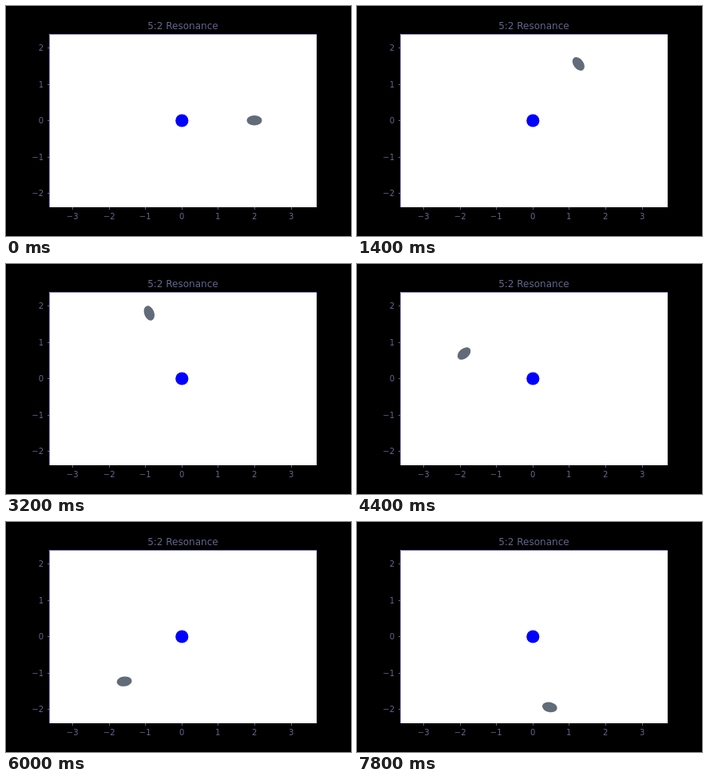
These frames come from a looping animation (432 px wide and 288 px high, 8000 ms). An HTML page:

```html
<!DOCTYPE html>
<html lang="en">
<head>
<meta charset="utf-8">
<title>5:2 Resonance</title>
<style>
  html, body { margin: 0; width: 100%; height: 100%; overflow: hidden; background: #000; }
  svg { display: block; width: 432px; height: 288px; }
  text { font: 10px "DejaVu Sans", sans-serif; fill: #62668e; }
  .title { font-size: 12px; }
  .mid { text-anchor: middle; }
  .end { text-anchor: end; }
  .tick { stroke: #62668e; }
  .spine { stroke: #8282c8; fill: none; }
</style>
</head>
<body>
<svg viewBox="0 0 432 288">
  <text class="title mid" x="221.4" y="29">5:2 Resonance</text>
  <g id="axes"></g>
  <rect x="54" y="35" width="335" height="217" fill="#fff"/>
  <path class="spine" d="M54.5 252V35.5H389"/>
  <circle cx="220.3" cy="143.5" r="8.1" fill="#00f"/>
  <ellipse id="moon" rx="9.5" ry="6.2" fill="#626b78"/>
</svg>
<script>
const CENTER = { x: 219.8, y: 143.25 };
const UNIT = 45.6;
const ORBIT = 2 * UNIT;
const STEP_MS = 200, STEPS = 40;
const ORBIT_STEP = 720 / 99;   // degrees per step: two orbits ...
const SPIN_STEP = 1800 / 99;   // ... for every five spins

const axes = document.getElementById('axes');
const moon = document.getElementById('moon');

function add(name, attrs, content = '') {
  const node = document.createElementNS('http://www.w3.org/2000/svg', name);
  for (const key in attrs) node.setAttribute(key, attrs[key]);
  node.textContent = content;
  axes.append(node);
}

const label = n => String(n).replace('-', '\u2212');
const snap = v => Math.round(v) + 0.5;

for (let n = -3; n <= 3; n++) {
  const x = snap(CENTER.x + n * UNIT);
  add('path', { class: 'tick', d: `M${x} 252v3` });
  add('text', { class: 'mid', x: x - 0.3, y: 267 }, label(n));
}
for (let n = -2; n <= 2; n++) {
  const y = snap(CENTER.y - n * UNIT);
  add('path', { class: 'tick', d: `M54 ${y}h-2` });
  add('text', { class: 'end', x: 47, y: y + 3.5 }, label(n));
}

function draw(time) {
  const step = Math.floor(time / STEP_MS) % STEPS;
  const angle = step * ORBIT_STEP * Math.PI / 180;
  const x = CENTER.x + ORBIT * Math.cos(angle);
  const y = CENTER.y - ORBIT * Math.sin(angle);
  moon.setAttribute('transform', `translate(${x} ${y}) rotate(${-step * SPIN_STEP})`);
}

const start = performance.now();
function loop() {
  draw(performance.now() - start);
  requestAnimationFrame(loop);
}
loop();
</script>
</body>
</html>
```
